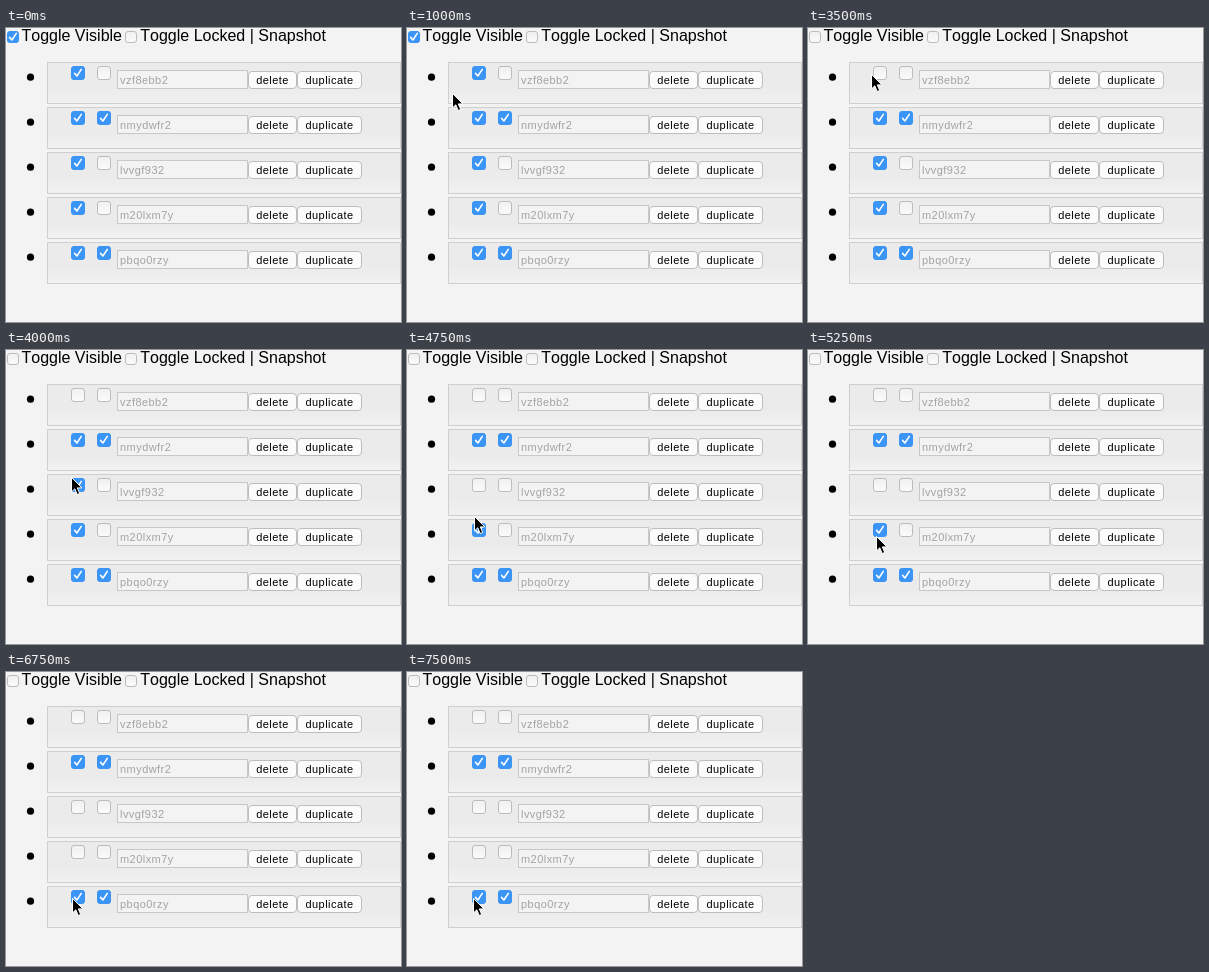
These frames come from a looping animation (395 px wide and 294 px high, 8000 ms). An HTML page:

```html
<!DOCTYPE html>
<html lang="en">
<head>
<meta charset="utf-8">
<title>Layer list</title>
<style>
  html, body { margin: 0; width: 100%; height: 100%; overflow: hidden; background: #f3f3f3; }
  svg { display: block; width: 395px; height: 294px; }
  text { font: 11px "Liberation Sans", Arial, sans-serif; font-kerning: none; letter-spacing: .45px; }
  .head { font-size: 16px; letter-spacing: 0; }
  .name { fill: #a3a3a3; }
</style>
</head>
<body>
<svg id="stage" viewBox="0 0 395 294">
  <defs>
    <linearGradient id="rowFill" x2="0" y2="1">
      <stop offset=".6" stop-color="#ebebeb"/>
      <stop offset="1" stop-color="#f1f1f1"/>
    </linearGradient>
    <linearGradient id="boxFill" x2="0" y2="1">
      <stop offset="0" stop-color="#f0f0f0"/>
      <stop offset="1" stop-color="#fbfbfb"/>
    </linearGradient>
  </defs>
</svg>
<script>
const DURATION = 8000;
const TICK = 250;
const ROW_STEP = 45;
const stage = document.getElementById('stage');

function add(parent, tag, attrs, text) {
  const el = document.createElementNS('http://www.w3.org/2000/svg', tag);
  for (const key in attrs) el.setAttribute(key, attrs[key]);
  if (text) el.textContent = text;
  return parent.appendChild(el);
}

// Samples a value once per tick and holds it until the next.
function playTicks(el, property, valueAt) {
  const frames = [];
  for (let time = 0; time <= DURATION; time += TICK) {
    frames.push({ offset: time / DURATION, [property]: valueAt(time), easing: 'step-end' });
  }
  el.animate(frames, { duration: DURATION, iterations: Infinity });
}

// Edges are whole pixels; the one-pixel border lies inside them.
function panel(parent, x, y, width, height, fill, stroke, rx = 0) {
  return add(parent, 'rect', {
    x: x + 0.5, y: y + 0.5, width: width - 1, height: height - 1, rx, fill, stroke
  });
}

function checkbox(parent, x, y, size, checked, offAt) {
  const box = add(parent, 'g', { transform: `translate(${x} ${y})` });
  panel(box, 0, 0, size, size, 'url(#boxFill)', '#bcbcbc', 2.5);
  if (!checked) return;
  const on = add(box, 'g', {});
  panel(on, 0, 0, size, size, '#3a95f7', '#3a95f7', 2.5);
  const mid = size / 2;
  add(on, 'path', {
    d: `M${mid - 3.4} ${mid + 0.4}l2.3 2.6l4.4-6.6`, fill: 'none', stroke: '#fff',
    'stroke-width': 1.6, 'stroke-linecap': 'round', 'stroke-linejoin': 'round'
  });
  if (offAt) playTicks(on, 'opacity', time => time < offAt ? 1 : 0);
}

function button(parent, x, width, label) {
  panel(parent, x, 43, width, 18, '#fbfbfb', '#bdbdbd', 3.5);
  add(parent, 'text', { x: x + width / 2, y: 56, 'text-anchor': 'middle' }, label);
}

const clicks = { vzf8ebb2: 3500, lvvgf932: 4500, m20lxm7y: 5750 };

checkbox(stage, 1, 3, 12, true, clicks.vzf8ebb2);
add(stage, 'text', { x: 15.5, y: 13, class: 'head' }, 'Toggle Visible');
checkbox(stage, 119, 3, 12, false);
add(stage, 'text', { x: 134.3, y: 13, class: 'head' }, 'Toggle Locked | Snapshot');

// Every second pair of rows is locked; a click hides an unlocked one.
['vzf8ebb2', 'nmydwfr2', 'lvvgf932', 'm20lxm7y', 'pbqo0rzy'].forEach((name, i) => {
  const row = add(stage, 'g', { transform: `translate(0 ${i * ROW_STEP})` });
  add(row, 'circle', { cx: 24.5, cy: 49.2, r: 3.6 });
  panel(row, 41, 34, 354, 42, 'url(#rowFill)', '#cfcfcf');
  checkbox(row, 65, 38, 14, true, clicks[name]);
  checkbox(row, 91, 38, 14, i % 3 === 1);
  panel(row, 111, 42, 131, 19, '#f3f3f3', '#c8c8c8');
  add(row, 'text', { x: 114, y: 56, class: 'name' }, name);
  button(row, 242, 49, 'delete');
  button(row, 291, 65, 'duplicate');
});

const linear = t => t;
const easeOut = t => 1 - (1 - t) ** 2.4;
const smooth = t => t * t * (3 - 2 * t);

// Each move glides from the previous stop; the pointer rests in between.
const moves = [
  { start: 250, end: 750, x: 141, y: 58, ease: linear },
  { start: 750, end: 1000, x: 45, y: 65, ease: linear },
  { start: 1000, end: 1500, x: 51, y: 54, ease: linear },
  { start: 2250, end: 3000, x: 63, y: 46, ease: linear },
  { start: clicks.vzf8ebb2, end: 4250, x: 65, y: 133, ease: easeOut },
  { start: clicks.lvvgf932, end: 5250, x: 68, y: 186, ease: easeOut },
  { start: clicks.m20lxm7y, end: 6750, x: 66, y: 226, ease: smooth }
];

function pointerAt(time) {
  let x = 281, y = 27;
  for (const move of moves) {
    if (time <= move.start) break;
    const part = move.ease(Math.min(1, (time - move.start) / (move.end - move.start)));
    x += (move.x - x) * part;
    y += (move.y - y) * part;
  }
  return `translate(${Math.round(x)}px, ${Math.round(y)}px)`;
}

const pointer = add(stage, 'path', {
  d: 'M.5 .4V14.9L3.8 11.8L6.2 17.5L8.7 16.4L6.3 10.9H10.9Z',
  fill: '#000', stroke: '#fff'
});
playTicks(pointer, 'transform', pointerAt);
playTicks(pointer, 'opacity', time => time < TICK ? 0 : 1);
</script>
</body>
</html>
```
